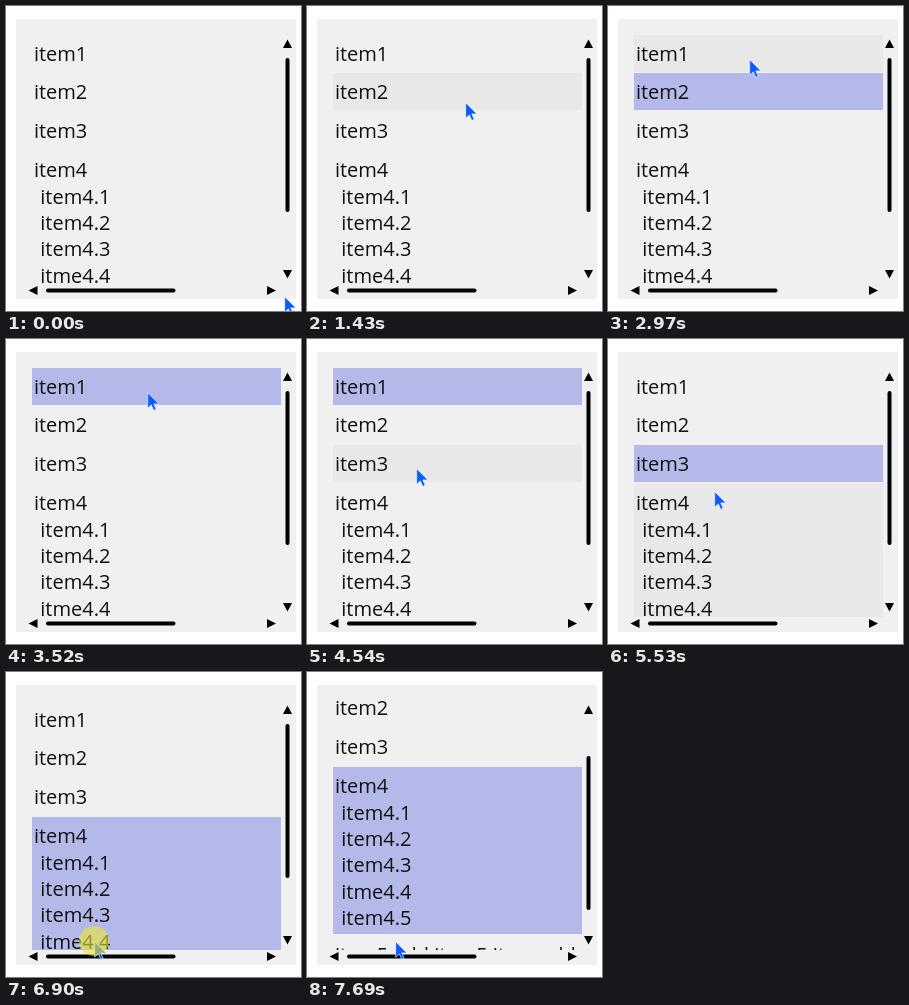
These frames come from a looping animation (295x305 px, 8 s). An HTML page:

```html
<!DOCTYPE html>
<html lang="en">
<head>
<meta charset="utf-8">
<title>Item list</title>
<style>
  html, body { margin: 0; width: 100%; height: 100%; overflow: hidden; background: #fff; }
  svg { display: block; }
  text { font: 20px "Open Sans", "Noto Sans", sans-serif; fill: #111; white-space: pre; }
  .thumb { stroke: #000; stroke-width: 4; stroke-linecap: round; }
</style>
</head>
<body>
<svg width="295" height="305" viewBox="0 0 295 305">
  <clipPath id="view"><rect x="26" y="27" width="249" height="251"/></clipPath>
  <rect x="10" y="13" width="280" height="280" fill="#f0f0f0"/>
  <g clip-path="url(#view)"><g id="list"></g></g>
  <path d="M281.5 33.5l4.5 8.5h-9zM281.5 272.5l4.5-8.5h-9zM22.5 284.5l9-4.5v9zM270 284.5l-9-4.5v9z"/>
  <path class="thumb" d="M42 284.5H167.5"/>
  <path class="thumb" id="thumb" d="M281.5 54V204"/>
  <path id="cursor" d="M.7.7V16.2L4.3 12.9 6.8 18.4 9.2 17.3 6.8 11.9H11.8Z"
        fill="#0a5cff" stroke="#fff" stroke-opacity=".75" stroke-width=".8"/>
  <circle id="click" r="15" fill="rgb(237,230,51)" fill-opacity=".6"/>
</svg>
<script>
const LOOP = 8000;
const $ = id => document.getElementById(id);

// top, bottom, lines of text
const rows = [
  [29, 66, 'item1'],
  [67, 104, 'item2'],
  [106, 143, 'item3'],
  [145, 312, 'item4', 'item4.1', 'item4.2', 'item4.3', 'itme4.4', 'item4.5'],
  [314, 351, 'item5 add item5 item add item5']
];

// start, end, number of steps, target x, target y
const moves = [
  [580, 1360, 12, 158, 97],
  [1430, 1430, 1, 158, 96],
  [2480, 2970, 8, 141, 53],
  [3920, 4540, 10, 109, 129],
  [5530, 6290, 12, 88, 273],
  [6620, 6700, 2, 88, 269]
];

// press, end of highlight, selected row
const clicks = [[1890, 2090, 1], [3320, 3520, 0], [4740, 5000, 2], [6900, 7160, 3]];

// time, list offset, thumb offset
const scrolls = [[0, 0, 0], [7490, 25, 16], [7690, 50, 32]];

function add(tag, attrs) {
  const el = document.createElementNS('http://www.w3.org/2000/svg', tag);
  for (const k in attrs) el.setAttribute(k, attrs[k]);
  return $('list').appendChild(el);
}

const boxes = rows.map(([top, bottom, ...lines]) => {
  const box = add('rect', { x: 26, y: top, width: 249, height: bottom - top });
  lines.forEach((line, i) => {
    add('text', { x: i ? 34.3 : 27.9, y: top + 26.3 + i * 26.3 }).textContent = line;
  });
  return box;
});

function cursorAt(t) {
  let x = 278, y = 290;
  for (const [start, end, n, tx, ty] of moves) {
    if (t < start) break;
    const gap = (end - start) / (n - 1 || 1);
    const step = t >= end ? n : Math.floor((t - start) / gap + 1e-6) + 1;
    const k = 1 - (1 - step / n) ** 2;
    x += (tx - x) * k;
    y += (ty - y) * k;
  }
  return [Math.round(x), Math.round(y)];
}

const place = (el, x, y) => el.setAttribute('transform', `translate(${x} ${y})`);

function draw(t) {
  const [x, y] = cursorAt(t);
  const click = clicks.filter(c => t >= c[0]).pop();
  const [, offset, thumb] = scrolls.filter(s => t >= s[0]).pop();

  boxes.forEach((box, i) => {
    const [top, bottom] = rows[i];
    const hover = x >= 26 && x < 275 && y < 278 && y >= top && y < bottom;
    box.setAttribute('fill', click && click[2] === i ? '#b4b9e9' : hover ? '#e8e8e8' : 'none');
  });
  place($('list'), 0, -offset);
  place($('thumb'), 0, thumb);
  place($('cursor'), x, y);
  place($('click'), x, y);
  $('click').setAttribute('visibility', click && t < click[1] ? 'visible' : 'hidden');
}

const begin = performance.now();
function tick() {
  draw((performance.now() - begin) % LOOP);
  requestAnimationFrame(tick);
}
tick();
</script>
</body>
</html>
```
